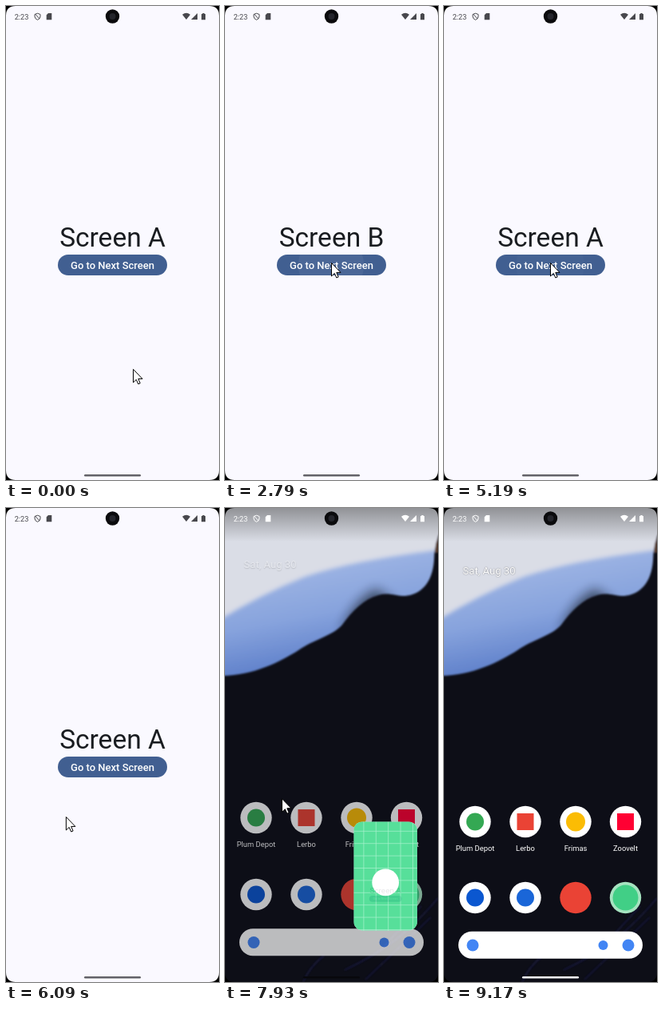
These frames come from a looping animation (267 by 593 pixels, 9.42 s). An HTML page:

```html
<!DOCTYPE html>
<html lang="en">
<head>
<meta charset="utf-8">
<title>Screen navigation</title>
<style>
  html, body { margin: 0; width: 100%; height: 100%; overflow: hidden; background: #000; }
  svg { display: block; width: 100vw; height: 100vh; }
  text { font-family: Roboto, sans-serif; }
  .mid { text-anchor: middle; }
  .date { text-shadow: 0 .5px 1.5px #0008; }
</style>
</head>
<body>
<svg viewBox="0 0 267 593" preserveAspectRatio="none">
  <defs>
    <linearGradient id="blue" x1="0" y1="0" x2=".25" y2="1">
      <stop offset=".25" stop-color="#adc0e8"/>
      <stop offset=".7" stop-color="#87a3dd"/>
      <stop offset="1" stop-color="#5a7cc8"/>
    </linearGradient>
    <linearGradient id="scrim" x1="0" y1="0" x2="0" y2="1">
      <stop offset="0" stop-color="#555" stop-opacity=".55"/>
      <stop offset="1" stop-color="#555" stop-opacity="0"/>
    </linearGradient>
    <filter id="soft"><feGaussianBlur stdDeviation="1.3"/></filter>
    <filter id="edge"><feGaussianBlur stdDeviation="2.5"/></filter>
    <filter id="haze" x="-30%" y="-30%" width="160%" height="160%"><feGaussianBlur stdDeviation="7"/></filter>
    <pattern id="grid" patternUnits="userSpaceOnUse" x="12" y="14" width="15.5" height="15.5">
      <path d="M.5 0V15.5M0 .5H15.5" stroke="#a0f0c8" stroke-width=".7"/>
    </pattern>
    <clipPath id="frame"><rect id="frameBox"/></clipPath>
    <clipPath id="buttonClip"><rect x="65" y="311" width="137" height="26" rx="13"/></clipPath>
    <clipPath id="body"><path d="M-5-5H272V26Q262 40 262 66C260 92 247 108 226 110C212 110 206 105 192 109C174 114 160 128 147 146C135 160 112 164 92 178C70 192 35 210-5 210Z"/></clipPath>
  </defs>

  <g id="home">
    <rect width="267" height="593" fill="#0d0e17"/>
    <g filter="url(#soft)">
      <path d="M265 34V56" stroke="#5a4032" stroke-width="5"/>
      <g clip-path="url(#body)">
        <rect x="-5" y="-5" width="280" height="216" fill="url(#blue)"/>
        <path d="M-20-20H290V50Q165 64 100 86Q40 110-20 148Z" fill="#dadde6" filter="url(#edge)"/>
        <path d="M145 156Q160 114 190 101L214 118Z" fill="#171a28" opacity=".65" filter="url(#haze)"/>
      </g>
    </g>
    <rect width="267" height="42" fill="url(#scrim)"/>
    <path d="M267 488Q240 520 214 540T150 578M124 560Q106 574 98 593M246 498L196 552M258 512Q220 548 176 590" fill="none" stroke="#1e1f4c" stroke-width="1.6" opacity=".75" filter="url(#soft)"/>
    <g id="items"></g>
  </g>

  <g id="app" clip-path="url(#frame)">
    <g id="page">
      <rect width="267" height="593" fill="#faf9ff"/>
      <text id="title" class="mid" x="133.5" y="300.5" font-size="33.5" fill="#191c20"></text>
      <rect x="65" y="311" width="137" height="26" rx="13" fill="#415f91"/>
      <circle id="ripple" cx="133" cy="324" fill="#fff" clip-path="url(#buttonClip)"/>
      <text class="mid" x="133.5" y="328.5" font-size="13" font-weight="500" fill="#fff">Go to Next Screen</text>
    </g>
    <g id="splash">
      <rect x="-100" y="-100" width="300" height="400" fill="#45dc8f"/>
      <rect x="-100" y="-100" width="300" height="400" fill="url(#grid)"/>
      <circle cx="40" cy="79" r="17" fill="#fff"/>
    </g>
  </g>

  <g id="back">
    <circle r="16" fill="#c3cae0"/>
    <path d="M2.5-5.5L-2 0L2.5 5.5" fill="none" stroke="#1d2433" stroke-width="2.8"/>
  </g>

  <g id="status">
    <text x="10.7" y="17" font-size="9.2" fill="currentColor">2:23</text>
    <path d="M39.5 9.2L43 10.5V13Q43 16 39.5 17.4Q36 16 36 13V10.5ZM36.8 10.2L42 16" fill="none" stroke="currentColor"/>
    <path d="M53 9H57.3V17.3H50.7V11.3ZM221 10.8Q226 6.8 231 10.8L226 17ZM240 9V17H232ZM245 10H246.3V9H248.7V10H250V17.3H245Z" fill="currentColor"/>
  </g>
  <circle cx="133.5" cy="13" r="8.7" fill="#0b0b0d"/>
  <circle cx="133.5" cy="13" r="4" fill="#24252b"/>
  <rect id="pill" x="98" y="586" width="71" height="2.6" rx="1.3"/>
  <path id="cursor" d="M.5.5V17L4.3 13.4L6.8 19L9.2 18L6.8 12.4H12Z" fill="#fff" stroke="#000"/>
  <path d="M0 0H267V593H0ZM12 0Q0 0 0 12V581Q0 593 12 593H255Q267 593 267 581V12Q267 0 255 0Z" fill-rule="evenodd"/>
</svg>

<script>
const LOOP = 9420, LEAVE = 7840;
const $ = id => document.getElementById(id);
const set = (id, attrs) => { for (const k in attrs) $(id).setAttribute(k, attrs[k]); };
const clamp = v => Math.min(1, Math.max(0, v));
const mix = (a, b, p) => a + (b - a) * p;
const ramp = (t, from, to) => clamp((t - from) / (to - from));

// Home screen items, each with its resting height
const dot = (x, y, r, fill) => `<circle cx="${x}" cy="${y}" r="${r}" fill="${fill}"/>`;
const square = (x, y, s, fill) => `<rect x="${x - s / 2}" y="${y - s / 2}" width="${s}" height="${s}" fill="${fill}"/>`;
const label = (x, s) => `<text class="mid" x="${x}" y="428.7" font-size="9.4" fill="#fff">${s}</text>`;
const disc = (x, y) => dot(x, y, 19.7, "#fff");
const items = [
  [78, `<text class="date" x="23.5" y="83" font-size="13.1" fill="#fff">Sat, Aug 30</text>`],
  [392, disc(39, 392.5) + dot(39, 392.5, 11, "#34a853") + label(39, "Plum Depot")
      + disc(102, 392.5) + square(102, 392.5, 21, "#ea4335") + label(102, "Lerbo")
      + disc(165, 392.5) + dot(165, 392.5, 12, "#fbbc04") + label(165, "Frimas")
      + disc(227.5, 392.5) + square(227.5, 392.5, 21, "#ff0033") + label(227.5, "Zoovelt")],
  [488, disc(39, 487.5) + dot(39, 487.5, 11, "#0b57d0")
      + disc(102, 487.5) + dot(102, 487.5, 11, "#1a66d8")
      + dot(165, 487.5, 19.7, "#ea4335")
      + dot(227.5, 487.5, 19.7, "#a6e3c0") + dot(227.5, 487.5, 16, "#41cf86")],
  [546, `<rect x="18" y="529.7" width="231" height="34" rx="17" fill="#fff"/>`
      + dot(36, 547, 7.5, "#4285f4") + dot(199.5, 547, 6, "#4285f4") + dot(231, 547, 7.5, "#4285f4")],
];
$("items").innerHTML = items.map(i => `<g>${i[1]}</g>`).join("");

// Pointer path: time, x, y
const path = [
  [30, 159, 454], [250, 166, 430], [500, 148, 370], [840, 106, 318],
  [1020, 106, 318], [1090, 110, 321], [1750, 110, 321], [1810, 133, 321],
  [5730, 133, 321], [6090, 75, 386], [6400, 36, 395], [6660, 15, 380],
  [6850, 15, 380], [7050, 2, 376], [7780, 71, 363], [8300, 71, 364], [8620, -16, 385],
];
function pointer(t) {
  const n = path.findIndex(k => k[0] > t);
  if (n < 1) return path[n ? path.length - 1 : 0].slice(1);
  const a = path[n - 1], b = path[n], p = ramp(t, a[0], b[0]);
  return [mix(a[1], b[1], p), mix(a[2], b[2], p)];
}

function drawApp(t) {
  $("title").textContent = t >= 2670 && t < 4300 ? "Screen B" : "Screen A";
  const tap = t < 4300 ? t - 2670 : t - 4300;
  set("ripple", {
    r: mix(17, 43, ramp(tap, 0, 130)),
    opacity: tap < 0 ? 0 : mix(.09, .04, ramp(tap, 0, 150)) * (1 - ramp(tap, 840, 930)),
  });

  // The window jumps inwards, then settles into its launcher icon
  const p = t < LEAVE ? 0 : 1 - Math.exp((LEAVE - 60 - t) / 86.3);
  const w = mix(267, 40, p), h = mix(593, 40, p);
  const cx = mix(133.5, 227.5, p ** 1.72), cy = mix(296.5, 487.5, p ** .8);
  const x = cx - w / 2, y = cy - h / 2;
  set("frameBox", { x, y, width: w, height: h, rx: p ? mix(9, 20, p ** 9) : 0 });
  set("page", { transform: `translate(${x} ${y}) scale(${w / 267})` });
  set("splash", {
    transform: `translate(${cx} ${cy}) scale(${w / 80}) translate(-40 -71)`,
    opacity: p && ramp(t, LEAVE - 60, LEAVE + 108),
  });
  set("app", { opacity: 1 - ramp(t, 8010, 8260) });
}

function drawHome(t) {
  const e = Math.exp((7930 - Math.max(t, LEAVE)) / 150);
  items.forEach(([y], i) => {
    const g = $("items").children[i];
    g.setAttribute("transform", `translate(0 ${(.0097 * y - 8.8) * e})`);
    g.setAttribute("opacity", clamp(1 - (i ? .28 : .7) * e));
  });
}

function draw(t) {
  const away = t >= LEAVE;
  $("home").style.display = away ? "" : "none";
  drawHome(t);
  drawApp(t);

  const q = ramp(t, 7050, 7500), out = 1 - (1 - q) ** 2;
  set("back", {
    transform: `translate(${mix(-16, 25, out)} 327) scale(${mix(.4, 1, out)} ${mix(.7, 1, out)})`,
    opacity: q ? 1 - ramp(t, LEAVE - 20, LEAVE + 80) : 0,
  });
  set("status", { color: away ? "#fff" : "#48484d" });
  set("pill", { fill: !away ? "#626267" : t < 8840 ? "#08080c" : t < 9170 ? "#999" : "#fff" });
  set("cursor", { transform: `translate(${pointer(t)})` });
}

const start = performance.now();
function tick() {
  draw((performance.now() - start) % LOOP);
  requestAnimationFrame(tick);
}
tick();
</script>
</body>
</html>
```
